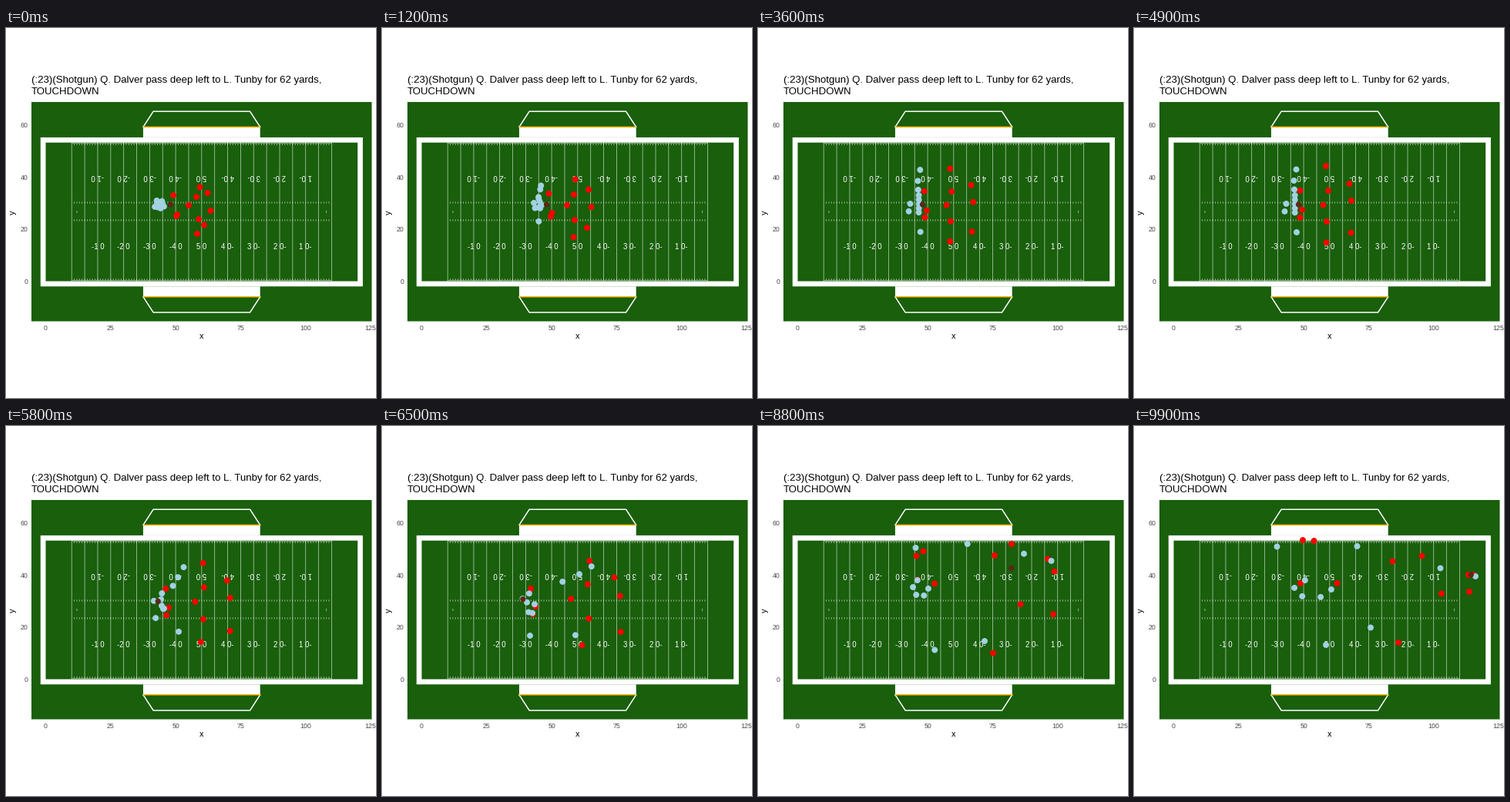
Recreate the animation shown at these times as a matplotlib script. Size 480 px wide and 480 px high, loop 10 s.

```python
import numpy as np
import matplotlib.pyplot as plt
from matplotlib.animation import FuncAnimation
from matplotlib.patches import Circle, Polygon, Rectangle

SIZE, FRAMES, STEP = 480, 100, 100
GREEN, RED, BLUE, BROWN = "#195f0c", "#ff0000", "#a2d1e3", "#5e2717"
GREY = "#4d4d4d"
READY, SET, SNAP, BREAK, THROW, CHASE, END = (
    2500, 4900, 5500, 6500, 7500, 8800, 9900)
SPOT = np.array([213.5, 229.0])

plt.rcParams["font.family"] = ["Liberation Sans"]
plt.rcParams["path.snap"] = False
fig = plt.figure(figsize=(SIZE / 72, SIZE / 72), dpi=72, facecolor="white")
ax = fig.add_axes([0, 0, 1, 1])
ax.set(xlim=(0, SIZE), ylim=(SIZE, 0))
ax.axis("off")


# ---- field ----

def X(yards):
    return 51.5 + 3.372 * np.asarray(yards)


def Y(yards):
    return 328.5 - 3.372 * np.asarray(yards)


def area(x, y, color):
    ax.add_patch(Polygon(np.column_stack([X(x), Y(y)]), fc=color, lw=0,
                         zorder=1))


def box(x0, y0, x1, y1, color):
    area([x0, x1, x1, x0], [y0, y0, y1, y1], color)


def ticks(xs, y0, y1, lw=0.8, alpha=0.65):
    ax.vlines(X(xs), Y(y0), Y(y1), color="white", lw=lw, alpha=alpha, zorder=2)


def label(x, y, text, size, color="black", **kw):
    opts = dict(ha="center", va="baseline", zorder=3)
    ax.text(x, y, text, fontsize=size, color=color, **{**opts, **kw})


def draw_field():
    ax.add_patch(Rectangle((33, 96), 441.5, 284.5, fc=GREEN, lw=0, zorder=0))
    wide = 160 / 3
    box(-2, -2, 122, wide + 2, "white")
    box(0, 0, 120, wide, GREEN)
    for edge, out in ((0, -1), (wide, 1)):
        near, bench, far = (edge + out * d for d in (2, 6, 12))
        box(37.5, near, 82.5, bench, "white")
        ax.plot(X([37.5, 41.4, 78.6, 82.5]), Y([bench, far, far, bench]),
                color="white", lw=1.5, zorder=2)
        ax.plot(X([37.5, 82.5]), Y([bench, bench]), color="#ffb300",
                lw=1.5, solid_capstyle="butt", zorder=3)
        ax.plot(X([10, 110]), Y([edge - out * 0.3] * 2), color="white",
                lw=0.7, alpha=0.6, zorder=2)
    ticks(np.arange(10, 111, 5), 0, wide)
    for y in (0.3, 23.1, 29.9, wide - 1):
        ticks(np.arange(11, 110), y, y + 0.7)
    ticks([12, 108], 26.2, 27.2)
    for yard in range(10, 100, 10):
        n = min(yard, 100 - yard) // 10
        text = "-" * (yard < 50) + f"{n} 0" + "-" * (yard > 50)
        for y, turn in ((284, 0), (193.2, 180)):
            label(X(yard + 10), y, text, 9.6, "white", va="center",
                  rotation=turn)


def draw_text():
    label(33, 71, "(:23)(Shotgun) Q. Dalver pass deep left to L. Tunby "
                  "for 62 yards,", 13.2, ha="left")
    label(33, 86, "TOUCHDOWN", 13.2, ha="left")
    for v in range(0, 126, 25):
        label(X(v), 391.5, str(v), 8.8, GREY)
    for v in range(0, 61, 20):
        label(28.5, Y(v) + 3, str(v), 8.8, GREY, ha="right")
    label(253.7, 402.7, "x", 11)
    label(9.3, 239, "y", 11, va="center", rotation=90)


# ---- motion ----

times = np.arange(FRAMES) * STEP
movers = []
rng = np.random.default_rng(7)


def slopes(h, d):
    """Monotone cubic tangents, so nothing overshoots its keys."""
    m = np.zeros(len(d) + 1)
    m[0], m[-1] = d[0], d[-1]
    for k in range(1, len(d)):
        if d[k - 1] * d[k] > 0:
            a, b = 2 * h[k] + h[k - 1], h[k] + 2 * h[k - 1]
            m[k] = (a + b) / (a / d[k - 1] + b / d[k])
    return m


def curve(t, p):
    h = np.diff(t)
    m = slopes(h, np.diff(p) / h)
    k = np.clip(np.searchsorted(t, times, "right") - 1, 0, len(h) - 1)
    s = (times - t[k]) / h[k]
    return (p[k] * (1 + 2 * s) * (1 - s) ** 2 + p[k + 1] * s * s * (3 - 2 * s)
            + h[k] * s * (1 - s) * (m[k] * (1 - s) - m[k + 1] * s))


def track(keys):
    """Smooth path through {time: point}, one row per frame."""
    t = np.array(sorted(keys), float)
    pts = np.array([keys[k] for k in sorted(keys)], float)
    return np.column_stack([curve(t, column) for column in pts.T])


def dot(path, color, zorder, radius=3.95):
    patch = Circle(path[0], radius, fc=color, lw=0, zorder=zorder)
    ax.add_patch(patch)
    movers.append((patch, path))
    return path


def line_up(start, stance, goal, settle):
    """Walk to the stance, then creep towards the goal at the snap."""
    return {0: start, READY: start + settle * (stance - start),
            SET: stance, SNAP: stance + 0.14 * (goal - stance)}


def run(start, stance, throw, end, settle, lead=(0.57, 0.2),
        bend=None, chase=None):
    """Run straight first and bend late; the upper half curls to the sideline."""
    start, stance, throw, end = map(np.array, (start, stance, throw, end))
    lift = np.array([0, 11 if throw[1] < 230 else 0])
    bend = stance + lead * (throw - stance) if bend is None else np.array(bend)
    chase = (throw + end) / 2 - lift if chase is None else chase
    return track({**line_up(start, stance, bend, settle), BREAK: bend,
                  THROW: throw, CHASE: chase, END: end})


def huddle():
    return np.array([199, 228]) + rng.uniform(-6, 6, 2)


def defend(start, stance, throw, end, **kw):
    dot(run(start, stance, throw, end, 0.7, **kw), RED, 5)


def attack(stance, throw, end, **kw):
    return dot(run(huddle(), stance, throw, end, 0.97, **kw), BLUE, 6)


def block(count=5):
    """The line stands in a row, then forms a ring that drifts and widens."""
    ring = {BREAK: (193, 230, 5, 14), THROW: (190, 222, 4, 8),
            CHASE: (211, 210, 10, 11), END: (232, 211, 24, 12)}
    for k in range(count):
        a = np.radians(245 - 60 * k)
        keys = {t: np.array([x + rx * np.cos(a), y + ry * np.sin(a)])
                for t, (x, y, rx, ry) in ring.items()}
        stance = np.array([208.7, 217 + 5.6 * k])
        keys.update(line_up(huddle(), stance, keys[BREAK], 0.97))
        dot(track(keys), BLUE, 6)


def throw_ball(passer, catcher, grab=5900, release=7800, catch=9400):
    """Snap to the passer, fly straight, then travel with the catcher."""
    held, caught = (np.roll(p, 1, axis=0) for p in (passer, catcher))
    a, b, c = grab // STEP, release // STEP, catch // STEP
    path = np.empty((FRAMES, 2))
    for i in range(FRAMES):
        if i < a:
            s = max(0, (times[i] - SNAP) / (grab - SNAP))
            path[i] = SPOT + s * (held[a] - SPOT)
        elif i < b:
            path[i] = held[i]
        elif i < c:
            path[i] = held[b] + (i - b) / (c - b) * (caught[c] - held[b])
        else:
            path[i] = caught[i]
    dot(path, BROWN, 7, 3.6)


draw_field()
draw_text()

# Secondary and linebackers
defend((251.5, 206.5), (249, 179), (284.5, 159.5), (373.5, 168.5))
defend((261.5, 214), (279.5, 202), (318, 174), (434, 193))
defend((247, 219), (252, 211), (278, 182.5), (335.5, 175.5))
defend((265.5, 237), (282, 224), (329, 206.5), (440, 193))
defend((250, 248), (250, 251), (282, 245), (399, 217.5))
defend((257, 255.5), (281.5, 265.5), (331, 273.5), (435, 215))
defend((248, 267), (249.5, 278.5), (267, 308), (343, 281))
defend((237, 230), (245.5, 229.5), (245, 203), (233.5, 149),
       chase=(214.5, 162.5))

# Pass rush
rush = (0.95, 0.1)
defend((217, 217), (215.5, 211), (192, 211), (219, 148), lead=rush)
defend((222, 242), (218, 236), (198, 217), (216, 204), lead=rush)
defend((221, 244), (215.5, 246), (194.5, 227), (263.5, 204), lead=rush)

# Receivers, running back, quarterback, line
target_man = attack((210.5, 183.5), (318, 177), (443, 195))
attack((207.5, 198), (292.5, 169), (397.5, 184.5))
attack((208, 209.5), (254, 172), (289.5, 156))
attack((211, 265), (281, 296.5), (307, 261.5))
attack((195.5, 238), (209.5, 297), (249, 284), bend=(192, 272))
passer = attack((197.5, 228), (194, 195), (185.5, 156.5),
                bend=(182.5, 224), chase=(204.5, 158))
block()
throw_ball(passer, target_man)


def update(i):
    for patch, path in movers:
        patch.center = path[i]
    return [patch for patch, _ in movers]


anim = FuncAnimation(fig, update, frames=FRAMES, interval=STEP,
                     repeat=True, repeat_delay=0, blit=False)
plt.show()
```
